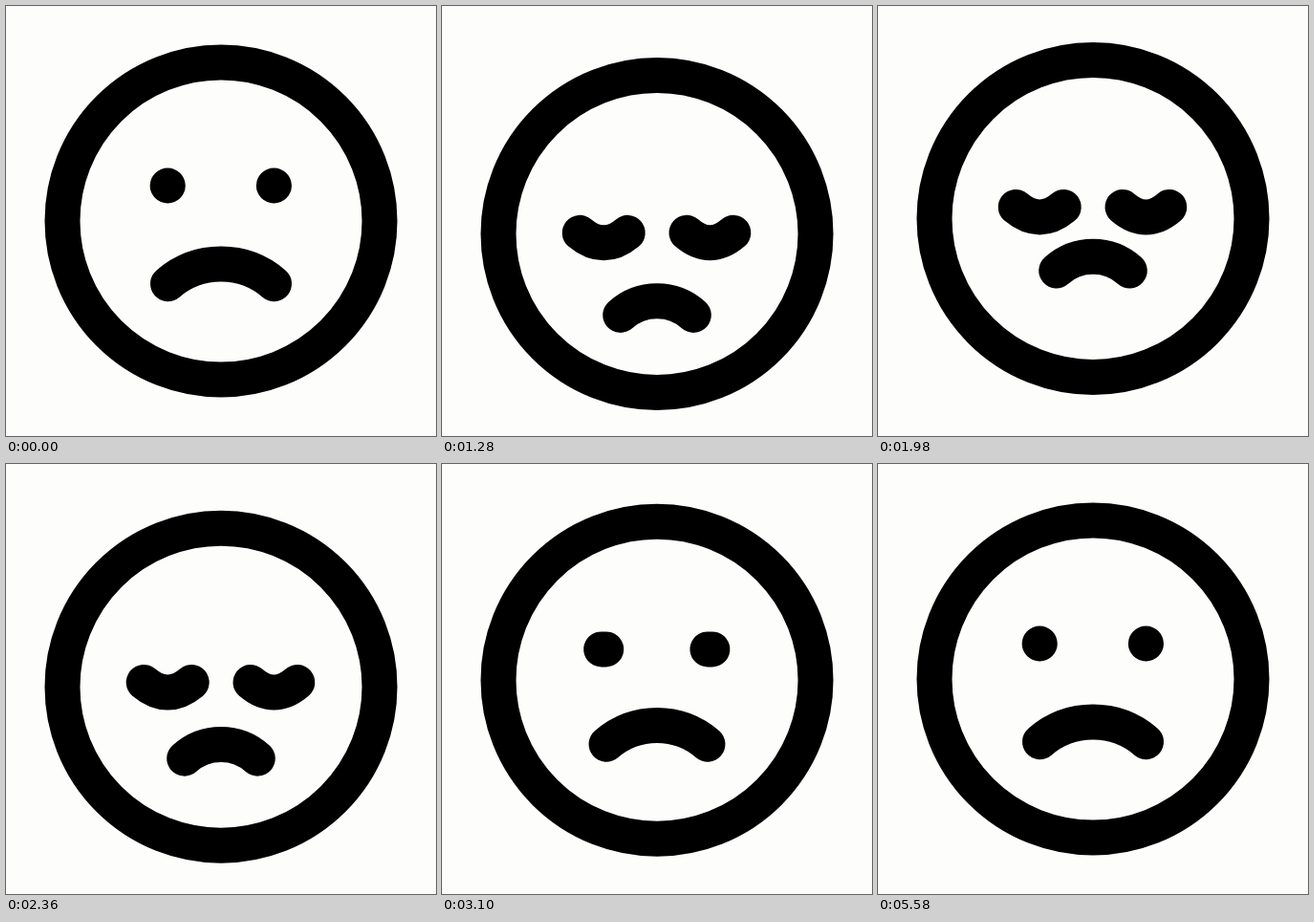
These frames come from a looping animation (450x450 px, 5.6 s). An HTML page:

```html
<!DOCTYPE html>
<html lang="en">
<head>
<meta charset="utf-8">
<title>Sad face</title>
<style>
  html, body { margin: 0; width: 100%; height: 100%; overflow: hidden; background: #fdfdfc; }
  svg { display: block; width: 100vw; height: 100vh; }
</style>
</head>
<body>
<svg viewBox="0 0 450 450" fill="none" stroke="#000" stroke-width="37" stroke-linecap="round">
  <circle id="head" cx="225" cy="225" r="166"/>
  <path id="left"/>
  <path id="right"/>
  <path id="mouth"/>
</svg>
<script>
const LOOP = 5600;
const [head, left, right, mouth] =
  ["head", "left", "right", "mouth"].map(id => document.getElementById(id));

// Tracks are [step, value] pairs, eased between neighbours.
const bob = [[22.3, 18], [41, -3.3], [56, 14.3], [69.5, 0]];
const headTrack = [[12.55, 0], ...bob];
const faceTrack = [[13.7, 0], ...bob];
const closeTrack = [[13.7, 0], [22.3, 1], [58, 1], [70, 0]];

const mix = (a, b, p) => a + (b - a) * p;
const ease = p => (1 - Math.cos(Math.PI * p)) / 2;

function sample(track, step) {
  if (step <= track[0][0]) return track[0][1];
  for (let i = 1; i < track.length; i++) {
    const [s0, v0] = track[i - 1], [s1, v1] = track[i];
    if (step < s1) return mix(v0, v1, ease((step - s0) / (s1 - s0)));
  }
  return track[track.length - 1][1];
}

// Steps last 100, 20 and 20 ms in turn, after one opening step of 20 ms.
function stepAt(ms) {
  if (ms < 20) return 0;
  const u = ms - 20, r = u % 140;
  return 1 + 3 * Math.floor(u / 140) + (r < 100 ? 0 : r < 120 ? 1 : 2);
}

function eye(x, half, y, sag) {
  return `M${x - half} ${y}Q${x} ${y + 2 * sag} ${x + half} ${y}`;
}

function arc(half, y, rise) {
  const r = (half * half + rise * rise) / (2 * rise);
  return `M${225 - half} ${y}A${r} ${r} 0 0 1 ${225 + half} ${y}`;
}

function draw(step) {
  const shift = sample(faceTrack, step);
  const shut = sample(closeTrack, step);
  const lid = shut ** 1.2;
  const eyeY = mix(188, 214.7, shut) + 1.68 * shift;
  const sag = 10.5 * lid * lid;
  const mouthY = mix(290.7, 284.3, shut) + 2.9 * shift;
  head.setAttribute("cy", 225 + sample(headTrack, step));
  left.setAttribute("d", eye(169.2, mix(0.05, 25, lid), eyeY, sag));
  right.setAttribute("d", eye(280.4, mix(0.05, 24.4, lid), eyeY, sag));
  mouth.setAttribute("d", arc(mix(55.5, 38.3, shut), mouthY, mix(20.6, 14.7, shut)));
}

function tick() {
  draw(stepAt(performance.now() % LOOP));
  requestAnimationFrame(tick);
}
tick();
</script>
</body>
</html>
```
